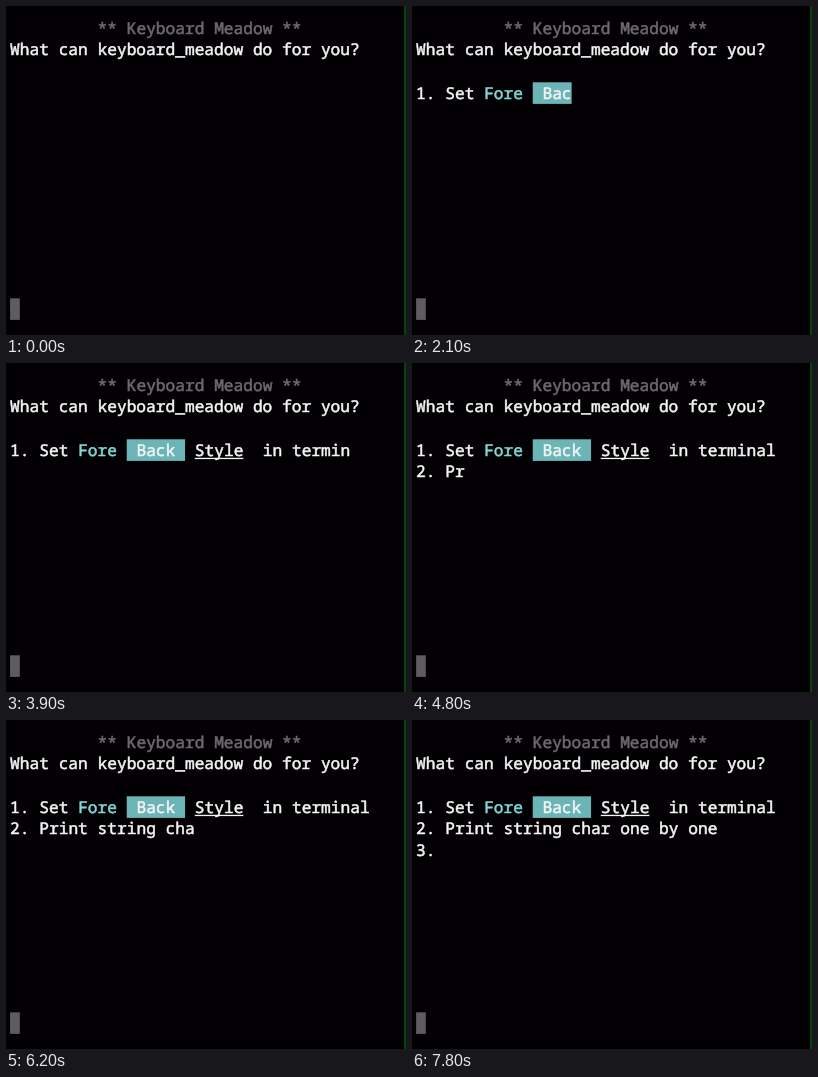
Animation, 400 px wide and 329 px high, one loop 8000 ms. Source, as an HTML page:

```html
<!DOCTYPE html>
<html lang="en">
<head>
<meta charset="utf-8">
<title>Typing terminal</title>
<style>
  html, body { margin: 0; width: 100%; height: 100%; overflow: hidden; background: #020003; }
  svg { display: block; width: 400px; height: 329px; }
  text {
    font: 500 16.2px "Noto Sans Mono", "DejaVu Sans Mono", monospace;
    white-space: pre;
    text-rendering: geometricPrecision;
    fill: currentColor;
    stroke: currentColor;
    stroke-width: 0.55px;
  }
</style>
</head>
<body>
<svg id="screen" viewBox="0 0 400 329"></svg>
<script>
const LOOP = 8000, STEP = 100;
const CELL = 9.72, LINE = 21.6, LEFT = 4.1, TOP = 11.5, BASE = 16.2;
const WHITE = '#f5f5f5', CYAN = '#82d9d5', TEAL = '#6bb5b7', GREY = '#6c6a6c';
const screen = document.getElementById('screen');

const colX = col => LEFT + col * CELL;
const rowY = row => TOP + row * LINE;

function add(tag, attrs) {
  const el = document.createElementNS('http://www.w3.org/2000/svg', tag);
  for (const key in attrs) el.setAttribute(key, attrs[key]);
  return screen.appendChild(el);
}

const bar = (x, y, width, height, fill) => add('rect', { x, y, width, height, fill });
const label = (row, col, color) => add('text', { x: colX(col), y: rowY(row) + BASE, color });

bar(0, 0, 400, 329, '#020003');
bar(398, 0, 2, 329, '#06430e');
bar(colX(0), rowY(13), CELL, LINE, '#5e5c5e');
label(0, 9, GREY).textContent = '** Keyboard Meadow **';
label(1, 0, WHITE).textContent = 'What can keyboard_meadow do for you?';

// Each run types one character per step: start time, row, column, text, style
const runs = [
  [500, 3, 0, '1.'],
  [800, 3, 3, 'Se'],
  [1100, 3, 5, 't'],
  [1300, 3, 7, 'Fore', 'fore'],
  [1800, 3, 12, ' Back ', 'back'],
  [2400, 3, 19, 'Sty', 'under'],
  [2700, 3, 22, 'le', 'under'],
  [3000, 3, 26, 'in'],
  [3300, 3, 29, 't'],
  [3500, 3, 30, 'erminal'],
  [4400, 4, 0, '2.'],
  [4700, 4, 3, 'Print'],
  [5300, 4, 9, 'strin'],
  [5900, 4, 14, 'g'],
  [6000, 4, 16, 'cha'],
  [6400, 4, 19, 'r'],
  [6500, 4, 21, 'one'],
  [6900, 4, 25, 'by'],
  [7200, 4, 28, 'one'],
  [7700, 5, 0, '3.']
].map(([start, row, col, text, style]) => {
  let fill = null;
  if (style === 'back') fill = bar(colX(col), rowY(row), 0, LINE, TEAL);
  if (style === 'under') fill = bar(colX(col), rowY(row) + 18.5, 0, 1.3, WHITE);
  return { start, text, fill, node: label(row, col, style === 'fore' ? CYAN : WHITE) };
});

function draw(now) {
  const time = now % LOOP;
  for (const { start, text, fill, node } of runs) {
    const typed = Math.floor((time - start) / STEP) + 1;
    const count = Math.max(0, Math.min(text.length, typed));
    node.textContent = text.slice(0, count);
    if (fill) fill.setAttribute('width', count * CELL);
  }
}

function tick() {
  draw(performance.now());
  requestAnimationFrame(tick);
}
tick();
</script>
</body>
</html>
```
